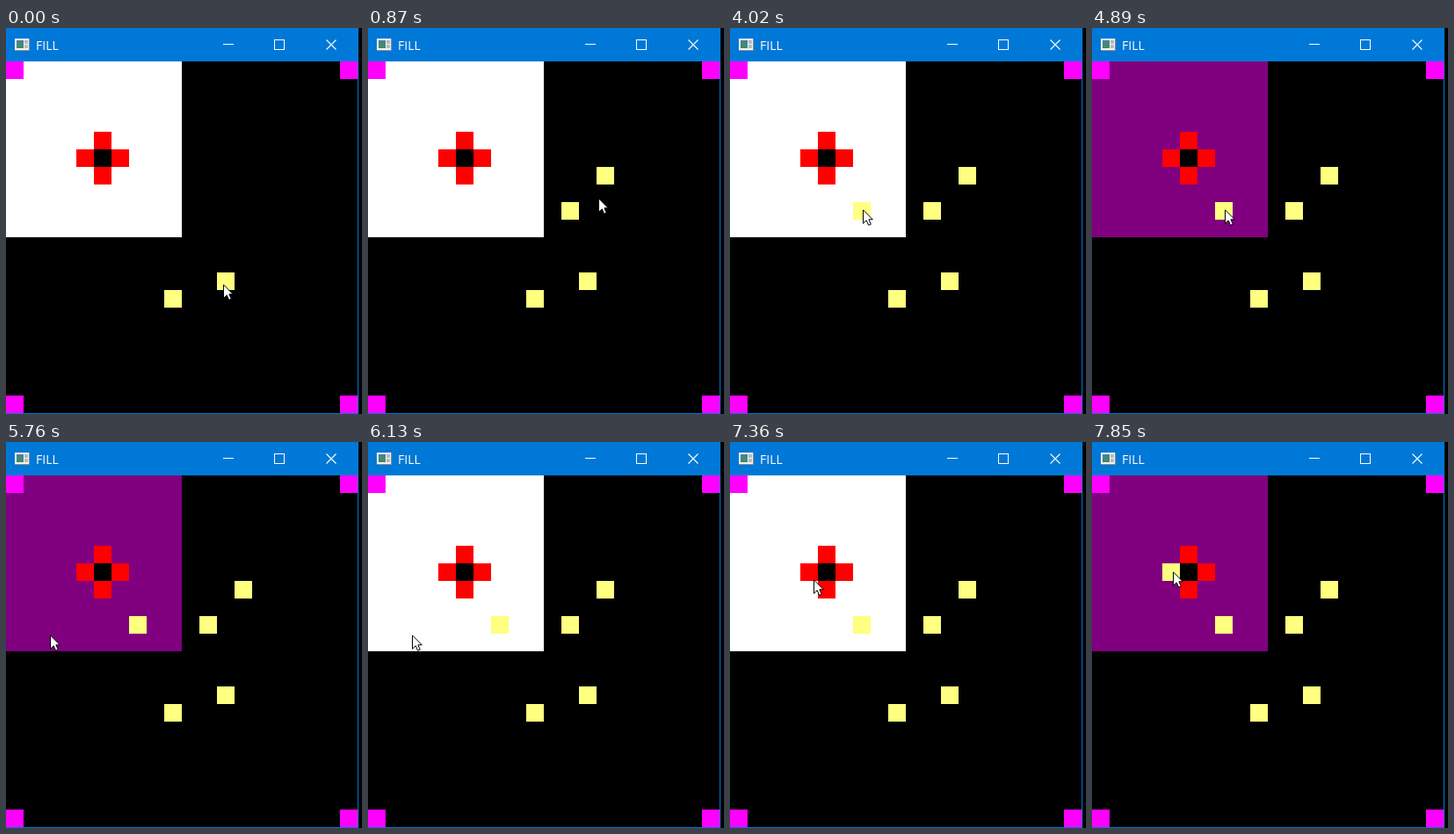
Write an HTML page that moves like this. It is 405 px wide and 439 px high and loops after 8 s.

```html
<!DOCTYPE html>
<html lang="en">
<head>
<meta charset="utf-8">
<title>FILL</title>
<style>
  html, body { margin: 0; width: 100%; height: 100%; overflow: hidden; background: #000; }
  svg { display: block; width: 405px; height: 439px; }
  .grid { shape-rendering: crispEdges; }
  .title { font: 14px "Open Sans", "Noto Sans", sans-serif; fill: #fff; }
  .corner { fill: #f0f; }
  .red { fill: #f00; }
  .dot { fill: #ffff80; }

  /* All changes are hard steps on one 8 s clock: 1% = 80 ms */
  .area, .late, .cursor { animation: 8s step-end infinite; }
  .area { animation-name: toggle; }
  .cursor { animation-name: move; }
  .d1 { animation-name: d1; }
  .d2 { animation-name: d2; }
  .d3 { animation-name: d3; }
  .d4 { animation-name: d4; }

  @keyframes toggle {
    0%, 76.625%, 87.5% { fill: #fff; }
    61.125%, 82.875%, 93.5%, 100% { fill: #800080; }
  }
  @keyframes d1 { 0% { opacity: 0; } 4.5%, 100% { opacity: 1; } }
  @keyframes d2 { 0% { opacity: 0; } 9%, 100% { opacity: 1; } }
  @keyframes d3 { 0% { opacity: 0; } 50.25%, 100% { opacity: 1; } }
  @keyframes d4 { 0% { opacity: 0; } 98.125%, 100% { opacity: 1; } }

  @keyframes move {
    0% { transform: translate(247px, 291px); }
    1.5% { transform: translate(240px, 258px); }
    3% { transform: translate(229px, 208px); }
    6% { transform: translate(252px, 188px); }
    7.5% { transform: translate(274px, 171px); }
    10.875% { transform: translate(262px, 193px); }
    12.375% { transform: translate(236px, 222px); }
    13.875% { transform: translate(219px, 239px); }
    23.25% { transform: translate(200px, 230px); }
    24.75% { transform: translate(166px, 211px); }
    26.25% { transform: translate(151px, 206px); }
    68.875% { transform: translate(128px, 204px); }
    70.375% { transform: translate(80px, 211px); }
    72% { transform: translate(50px, 219px); }
    89% { transform: translate(62px, 200px); }
    90.5% { transform: translate(83px, 172px); }
    92% { transform: translate(95px, 156px); }
    93.5% { transform: translate(95px, 155px); }
    96.625%, 100% { transform: translate(92px, 147px); }
  }
</style>
</head>
<body>
<svg viewBox="0 0 405 439">
  <defs>
    <rect id="cell" width="20" height="20"/>
    <linearGradient id="pane" x2="0" y2="1">
      <stop stop-color="#4a7fa0"/>
      <stop offset="1" stop-color="#3f8f5c"/>
    </linearGradient>
  </defs>

  <g class="grid">
    <rect width="405" height="439"/>
    <path fill="#0078d7" d="M0 0H401V439H0V438H400V38H0z"/>

    <!-- window icon -->
    <rect x="10" y="12" width="17" height="14" fill="#f2f2f2"/>
    <path fill="#8c8c8c" d="M10 25h17v1H10zM26 12h1v14h-1z"/>
    <rect x="12" y="14" width="8" height="9" fill="url(#pane)"/>
    <path fill="#b4bcc2" d="M21 14h4v4h-4zM21 19h4v4h-4z"/>

    <!-- window buttons -->
    <path fill="#fff" d="M247 18h12v1h-12zM305 13h12v12h-12zm1 1v10h10V14z" fill-rule="evenodd"/>

    <rect class="area" y="38" width="200" height="200" fill="#fff"/>

    <g class="corner">
      <use href="#cell" x="0" y="38"/>
      <use href="#cell" x="380" y="38"/>
      <use href="#cell" x="0" y="418"/>
      <use href="#cell" x="380" y="418"/>
    </g>
    <g class="red">
      <use href="#cell" x="100" y="118"/>
      <use href="#cell" x="80" y="138"/>
      <use href="#cell" x="120" y="138"/>
      <use href="#cell" x="100" y="158"/>
    </g>
    <use href="#cell" x="100" y="138"/>

    <g class="dot">
      <use href="#cell" x="180" y="298"/>
      <use href="#cell" x="240" y="278"/>
      <use class="late d1" href="#cell" x="220" y="198"/>
      <use class="late d2" href="#cell" x="260" y="158"/>
      <use class="late d3" href="#cell" x="140" y="198"/>
      <use class="late d4" href="#cell" x="80" y="138"/>
    </g>
  </g>

  <text class="title" x="34" y="25">FILL</text>
  <path stroke="#fff" stroke-width="1.1" d="M364.5 13.5l11 11m0-11l-11 11"/>

  <path class="cursor" fill="#fff" stroke="#000"
    d="M.5 .9V16.3L4.2 12.8L6.6 18.3L9.3 17.2L6.9 11.8H11.3z"/>
</svg>
</body>
</html>
```
